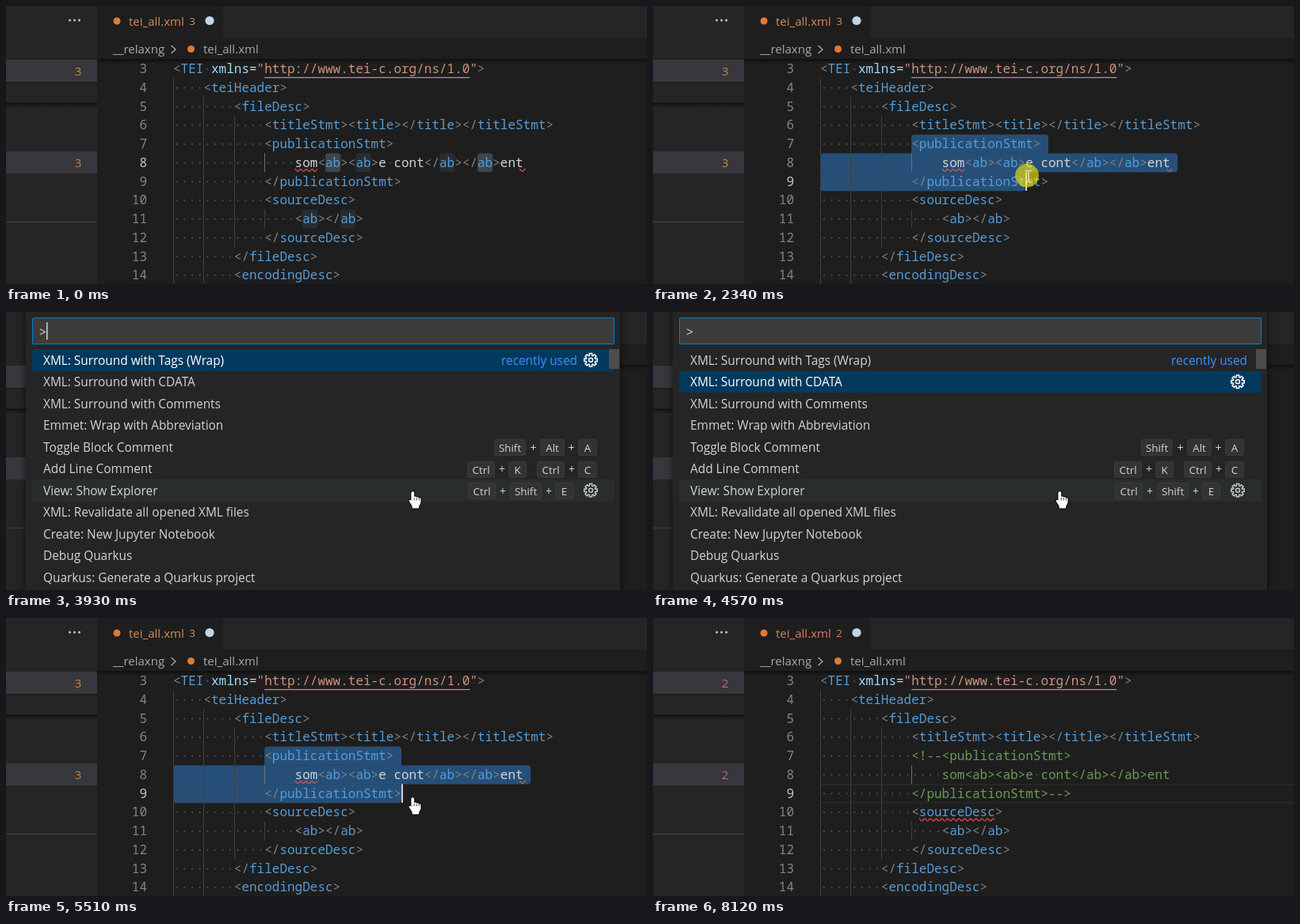
An HTML page with a canvas for the animation above (8.7 s loop, 809 by 352 pixels).

```html
<!DOCTYPE html>
<html lang="en">
<head>
<meta charset="utf-8">
<title>Surround with comments</title>
<style>
html, body { margin: 0; width: 100%; height: 100%; overflow: hidden; background: #1e1e1e; }
canvas { display: block; }
</style>
</head>
<body>
<canvas id="stage" width="809" height="352"></canvas>
<script>
const ctx = document.getElementById('stage').getContext('2d');
const LOOP = 8700;
const X0 = 211, CW = 9.6, TOP = 67.7, LH = 23.75, FIRST = 3;
const MONO = '16px "Noto Sans Mono", monospace';
const ui = size => `${size}px "Open Sans", sans-serif`;
const MENU = ui(15.4);

const LINES = [
  '<TEI xmlns="http://www.tei-c.org/ns/1.0">',
  '    <teiHeader>',
  '        <fileDesc>',
  '            <titleStmt><title></title></titleStmt>',
  '            <publicationStmt>',
  '                som<ab><ab>e cont</ab></ab>ent',
  '            </publicationStmt>',
  '            <sourceDesc>',
  '                <ab></ab>',
  '            </sourceDesc>',
  '        </fileDesc>',
  '        <encodingDesc>'
];
const COMMANDS = [
  ['XML: Surround with Tags (Wrap)'],
  ['XML: Surround with CDATA'],
  ['XML: Surround with Comments'],
  ['Emmet: Wrap with Abbreviation'],
  ['Toggle Block Comment', [['Shift', 616, 40], ['Alt', 674, 31], ['A', 722, 24]], [665.5, 713.5]],
  ['Add Line Comment', [['Ctrl', 582, 35], ['K', 634, 23], ['Ctrl', 670, 35], ['C', 722, 24]], [626, 714]],
  ['View: Show Explorer', [['Ctrl', 583, 35], ['Shift', 636, 40], ['E', 693, 23]], [627, 685]],
  ['XML: Revalidate all opened XML files'],
  ['Create: New Jupyter Notebook'],
  ['Debug Quarkus'],
  ['Quarkus: Generate a Quarkus project']
];

const colX = c => X0 + c * CW;
const rowY = n => TOP + (n - FIRST) * LH;
const within = (t, a, b) => t >= a && t < b;
const lerp = (a, b, p) => a + (b - a) * p;
const ease = p => p * p * (3 - 2 * p);

// Progress from 0 to 1 in n visible steps, the first one at time a.
function steps(t, a, b, n) {
  if (t < a) return 0;
  return Math.min(1, (Math.floor((t - a) / (b - a) * (n - 1) + 0.02) + 1) / n);
}

function rect(x, y, w, h, color) {
  ctx.fillStyle = color;
  ctx.fillRect(x, y, w, h);
}
function round(x, y, w, h, r, color) {
  ctx.fillStyle = color;
  ctx.beginPath();
  ctx.roundRect(x, y, w, h, r);
  ctx.fill();
}
function disc(x, y, r, color) {
  ctx.fillStyle = color;
  ctx.beginPath();
  ctx.arc(x, y, r, 0, Math.PI * 2);
  ctx.fill();
}
function text(s, x, y, font, color, align = 'left') {
  ctx.font = font;
  ctx.fillStyle = color;
  ctx.textAlign = align;
  ctx.fillText(s, x, y);
}
function fade(x, y, w, h, alpha) {
  const g = ctx.createLinearGradient(0, y, 0, y + h);
  g.addColorStop(0, `rgba(0,0,0,${alpha})`);
  g.addColorStop(1, 'rgba(0,0,0,0)');
  rect(x, y, w, h, g);
}
function squiggle(x1, x2, y) {
  ctx.strokeStyle = '#f14c4c';
  ctx.lineWidth = 1.2;
  ctx.beginPath();
  for (let x = x1; x <= x2; x += 0.5) {
    ctx.lineTo(x, y - 1.5 * Math.cos((x - x1) * Math.PI * 2 / 7.2));
  }
  ctx.stroke();
}

function mouseAt(t) {
  if (t < 140 || t >= 7840) return null;
  if (t < 950) {
    const p = steps(t, 210, 730, 8), q = 1 - p;
    return [q * q * 503 + 2 * q * p * 395 + p * p * 361.5,
            q * q * 261 + 2 * q * p * 98 + p * p * 187];
  }
  if (t < 1750) {
    const p = ease(steps(t, 950, 1310, 6));
    return [lerp(361, t < 1530 ? 330.5 : 329.5, p), lerp(187, 175, p)];
  }
  if (t < 6540) {
    const p = ease(steps(t, 1890, 2540, 10));
    return [lerp(329, 514, p), lerp(175, 227, p)];
  }
  const p = ease(steps(t, 6540, 6760, 4)), q = steps(t, 7550, 7770, 4);
  return [lerp(lerp(514, 668, p), 757, q), lerp(lerp(227, 299, p), 335, q)];
}

function dragEnd(t) {
  const [x, y] = mouseAt(Math.min(t, 3000));
  const line = Math.min(9, Math.floor((y - TOP) / LH) + FIRST);
  const col = Math.round((x - X0) / CW);
  return { line, col: Math.min(col, LINES[line - FIRST].length) };
}

function stateAt(t) {
  const commented = t >= 5580;
  const selecting = t >= 1820 && !commented;
  const end = selecting ? dragEnd(t) : null;
  return {
    commented, selecting, end,
    active: selecting ? end.line : commented ? 9 : 8,
    caret: within(t, 1820, 2970) || within(t, 3500, 4000) || within(t, 5510, 6040) ||
           within(t, 6540, 7040) || within(t, 7550, 8120),
    fixed: t >= 6110,
    palette: within(t, 3850, 5510),
    hand: within(t, 3780, 5670)
  };
}

function sidebar(s) {
  const badge = s.fixed ? '2' : '3', color = s.fixed ? '#c0695d' : '#c58645';
  rect(0, 0, 115, 352, '#252526');
  for (const x of [80.5, 86.5, 92.5]) disc(x, 18, 1.5, '#c5c5c5');
  for (const [y, h] of [[68, 28], [184, 28]]) {
    rect(0, y, 115, h, '#37373d');
    text(badge, 91, y + 19.5, ui(15), color, 'center');
  }
  fade(0, 96, 115, 3, 0.3);
  rect(0, 122, 115, 1.5, '#1a1a1a');
  fade(0, 123, 115, 6, 0.5);
  rect(0, 273, 115, 1, '#424244');
}

function header(s) {
  const color = s.fixed ? '#d67f66' : '#d88a58';
  rect(115, 0, 694, 40, '#252526');
  rect(115, 0, 159, 40, '#1e1e1e');
  disc(140, 19, 4.5, '#e37933');
  text('tei_all.xml', 155, 24.5, ui(15), color);
  text(s.fixed ? '2' : '3', 235, 24, ui(13.5), color, 'center');
  disc(257, 18.5, 5.6, '#c3d4e4');
  text('__relaxng', 135, 60, ui(15), '#a9a9a9');
  ctx.strokeStyle = '#a9a9a9';
  ctx.lineWidth = 1.3;
  ctx.beginPath();
  ctx.moveTo(208.5, 50);
  ctx.lineTo(214, 55);
  ctx.lineTo(208.5, 60);
  ctx.stroke();
  disc(233.5, 54.5, 4.5, '#e37933');
  text('tei_all.xml', 249, 60, ui(15), '#a9a9a9');
}

function abMarks(t) {
  const focused = t >= 1750;
  const mark = (line, col, color) => round(colX(col), rowY(line), CW * 2, LH, 3, color);
  const soft = focused ? '#363c42' : '#272d33';
  for (const c of [24, 35]) mark(8, c, soft);
  for (const c of [17, 22]) mark(11, c, soft);
  for (const c of [20, 40]) mark(8, c, focused ? '#264f78' : '#3e454b');
}

function selection(end) {
  for (let n = 7; n <= end.line; n++) {
    const x1 = n === 7 ? colX(12) : X0;
    const x2 = n === end.line ? colX(end.col) : colX(LINES[n - FIRST].length + 1);
    const last = n === end.line ? 4 : 0;
    const radii = n === 7 ? [4, 4, last, last] : n === 8 ? [4, 4, 4, last] : [0, 0, 4, 4];
    if (x2 > x1) round(x1, rowY(n), x2 - x1, LH + 0.3, radii, '#264f78');
  }
}

function guides() {
  const bar = (col, from, to, color = '#404040') =>
    rect(Math.round(colX(col)), rowY(from), 1, rowY(to + 1) - rowY(from), color);
  bar(0, 4, 14);
  bar(4, 5, 14);
  bar(8, 6, 12);
  bar(12, 8, 8, '#707070');
  bar(12, 11, 11);
}

function codeLine(line, n, green) {
  const y = rowY(n) + LH / 2 + 5.6;
  let previous = '';
  for (const m of line.matchAll(/<!--|-->|<\/?|>|"|http[^"]+|=| |[^<>"= ]+/g)) {
    const s = m[0], x = colX(m.index);
    if (s === ' ') {
      disc(x + CW / 2, rowY(n) + LH / 2 + 0.3, 1.15, '#4a4a4a');
      continue;
    }
    let color = '#d4d4d4';
    if (green) color = '#6a9955';
    else if (/^[<>]/.test(s)) color = '#808080';
    else if (previous[0] === '<') color = '#569cd6';
    else if (s === 'xmlns') color = '#9cdcfe';
    else if (s === '"' || s.startsWith('http')) color = '#ce9178';
    text(s, x, y, MONO, color);
    if (s.startsWith('http')) rect(x, y + 4.8, s.length * CW, 1.2, color);
    previous = s;
  }
}

function editor(t, s) {
  rect(115, 0, 694, 352, '#1e1e1e');
  if (s.commented) {
    rect(X0, 210, 598, 1.5, '#2a2a2a');
    rect(X0, 233, 598, 1.5, '#2a2a2a');
  }
  if (t < 1820) abMarks(t);
  if (s.selecting) selection(s.end);
  guides();
  LINES.forEach((line, i) => {
    const n = i + FIRST, green = s.commented && n >= 7 && n <= 9;
    if (green && n === 7) line = line.replace('<', '<!--<');
    if (green && n === 9) line += '-->';
    codeLine(line, n, green);
    text(n, 178, rowY(n) + LH / 2 + 5.6, MONO, n === s.active ? '#c6c6c6' : '#858585', 'right');
  });
  if (t < 6180) {
    squiggle(colX(16), colX(19), 208);
    squiggle(648, 656, 208);
  } else {
    squiggle(colX(13), colX(23), 255.5);
  }
  const caret = (line, col) => rect(Math.round(colX(col)), rowY(line), 2, LH, '#d0d0cc');
  if (within(t, 1750, 1820)) {
    caret(8, 22);
    caret(8, 42);
  }
  if (s.caret) s.commented ? caret(9, 33) : s.end && caret(s.end.line, s.end.col);
  fade(115, 67, 694, 6, 0.5);
}

function gear(x, y, color) {
  ctx.strokeStyle = color;
  ctx.lineWidth = 1.5;
  ctx.beginPath();
  for (let i = 0; i < 8; i++) {
    const a = i * Math.PI / 4;
    for (const [d, r] of [[-0.27, 6], [-0.2, 8.4], [0.2, 8.4], [0.27, 6]]) {
      ctx.lineTo(x + r * Math.cos(a + d), y + r * Math.sin(a + d));
    }
  }
  ctx.closePath();
  ctx.stroke();
  ctx.beginPath();
  ctx.arc(x, y, 2.5, 0, Math.PI * 2);
  ctx.stroke();
}

function keyCap(label, x, y, w) {
  round(x, y, w, 21, 3.5, '#3a3a3b');
  round(x + 1, y + 1, w - 2, 19, 3, '#333334');
  text(label, x + w / 2, y + 15.5, ui(13.4), '#d4d4d4', 'center');
}

function palette(t) {
  const picked = t < 4570 ? 0 : t < 4790 ? 1 : 2;
  ctx.save();
  ctx.shadowColor = 'rgba(0,0,0,0.6)';
  ctx.shadowBlur = 10;
  rect(25, -20, 750, 400, '#252526');
  ctx.restore();
  round(33, 7, 735, 34, 2, '#007fd4');
  rect(34, 8, 733, 32, '#3c3c3c');
  text('>', 42, 30.5, MENU, '#d4d4d4');
  if (t < 4350 || within(t, 4940, 5440)) rect(51, 13, 1.6, 22, '#cccccc');

  COMMANDS.forEach(([label, keys, pluses], i) => {
    const mid = 61.5 + i * 27.5, base = Math.round(mid + 5.3), chosen = i === picked;
    const top = Math.floor(mid - 14), bottom = Math.floor(mid + 13.5);
    if (chosen) round(33, top, 735, bottom - top, 3, '#04395e');
    else if (i === 6) round(33, top, 735, bottom - top, 3, '#2a2d2e');
    text(label, 47, base, MENU, chosen ? '#ffffff' : '#d4d4d4');
    if (i === 0) text('recently used', chosen ? 721 : 750, base, MENU, '#3794ff', 'right');
    if (keys) {
      for (const [name, x, w] of keys) keyCap(name, x, Math.round(mid - 10.5), w);
      for (const x of pluses) text('+', x, base, ui(14), '#d4d4d4', 'center');
    }
    if (chosen || i === 6) gear(738, mid - 0.7, chosen ? '#ffffff' : '#c5c5c5');
  });
  rect(761, 47, 13, 25, '#4d4d4e');
}

function beam(x, y) {
  ctx.strokeStyle = '#e6e6e6';
  ctx.lineWidth = 1.4;
  ctx.beginPath();
  ctx.moveTo(x, y - 7);
  ctx.lineTo(x, y + 7);
  for (const e of [-7.3, 7.3]) {
    ctx.moveTo(x - 3.5, y + e);
    ctx.lineTo(x - 1, y + e);
    ctx.moveTo(x + 1, y + e);
    ctx.lineTo(x + 3.5, y + e);
  }
  ctx.stroke();
}

function hand(x, y) {
  ctx.save();
  ctx.translate(x, y);
  ctx.beginPath();
  ctx.moveTo(-1.8, 1.5);
  ctx.quadraticCurveTo(0, -1.5, 2, 1.5);
  ctx.lineTo(2, 7);
  ctx.quadraticCurveTo(4, 5.8, 5, 7.6);
  ctx.quadraticCurveTo(7, 6.4, 8, 8.4);
  ctx.quadraticCurveTo(10.4, 7.8, 10.4, 10.5);
  ctx.lineTo(10.2, 15);
  ctx.lineTo(8, 19);
  ctx.lineTo(8, 21.5);
  ctx.lineTo(-0.5, 21.5);
  ctx.lineTo(-0.7, 18.5);
  ctx.lineTo(-4.6, 12.5);
  ctx.quadraticCurveTo(-4.4, 9.2, -1.8, 12);
  ctx.closePath();
  ctx.lineWidth = 2;
  ctx.lineJoin = 'round';
  ctx.strokeStyle = '#000';
  ctx.stroke();
  ctx.fillStyle = '#fff';
  ctx.fill();
  ctx.lineWidth = 0.7;
  ctx.beginPath();
  for (const fx of [2, 5, 8]) {
    ctx.moveTo(fx, 8);
    ctx.lineTo(fx, 11.5);
  }
  ctx.stroke();
  ctx.restore();
}

function pointer(t, s) {
  const at = mouseAt(t);
  if (!at) return;
  const [x, y] = at;
  if (within(t, 1750, 2970)) {
    const alpha = t < 2690 ? 0.6 : t < 2900 ? 0.4 : 0.2;
    disc(x - 2, y - 1, 15, `rgba(255,240,0,${alpha})`);
  }
  s.hand ? hand(x - 0.8, y) : beam(x, y);
}

function draw(t) {
  const s = stateAt(t);
  editor(t, s);
  header(s);
  sidebar(s);
  if (s.palette) palette(t);
  pointer(t, s);
}

const start = performance.now();
function tick() {
  draw((performance.now() - start) % LOOP);
  requestAnimationFrame(tick);
}
tick();
</script>
</body>
</html>
```
